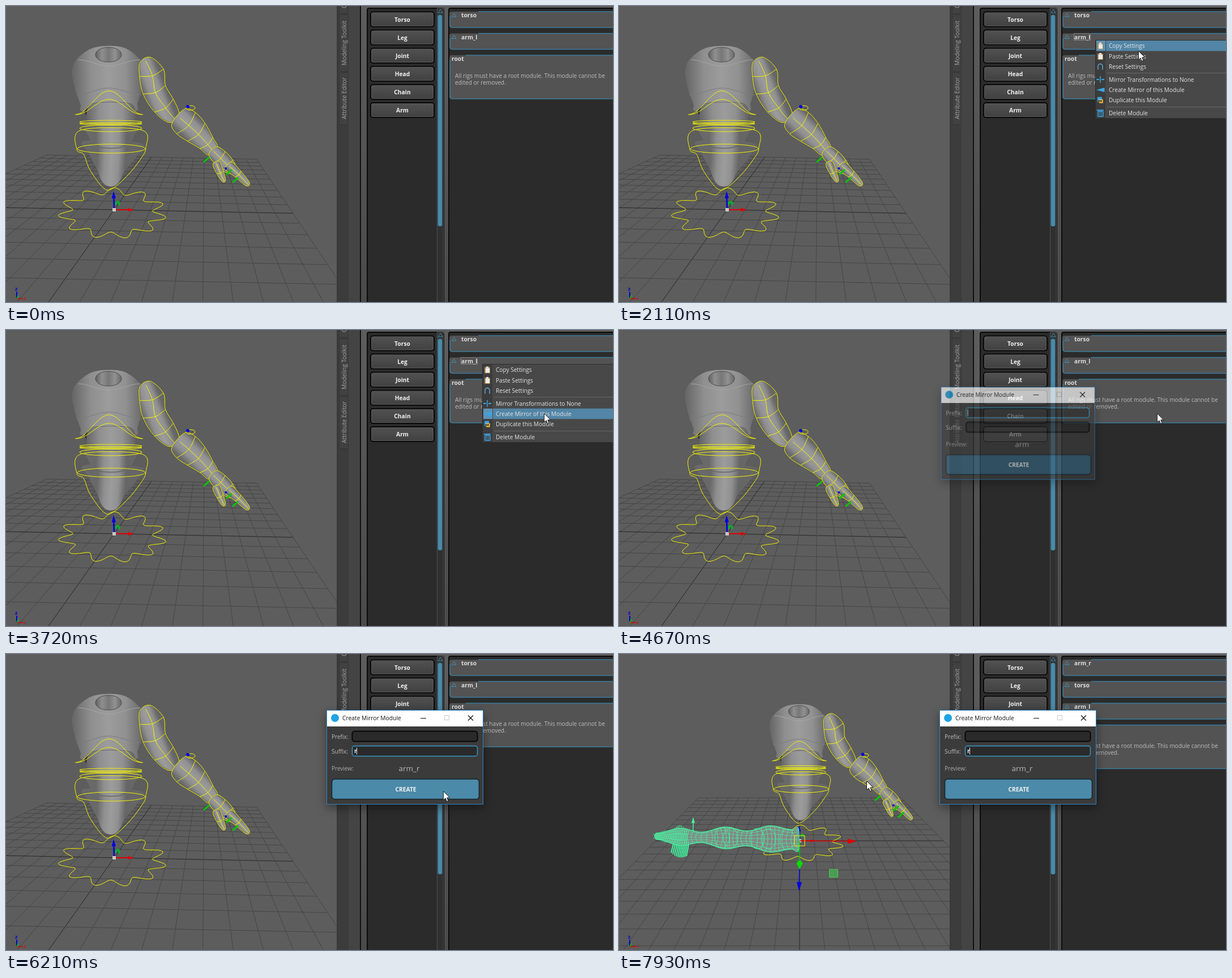
These frames come from a looping animation (1072x523 px, 8 s). An HTML page with a canvas:

```html
<!DOCTYPE html>
<html lang="en">
<head>
<meta charset="utf-8">
<title>Rig module mirroring</title>
<style>
html, body { margin: 0; width: 100%; height: 100%; overflow: hidden; background: #5d5d5d; }
canvas { display: block; }
</style>
</head>
<body>
<canvas id="stage" width="1072" height="523"></canvas>
<script>
const LOOP = 8000, W = 1072, H = 523;
const YELLOW = '#f4f400', BLUE = '#4b8aa8', GREEN = '#43f5a0', RED = '#e00000', DEEP_BLUE = '#0000e0';
const SKIN = ['#696969', '#8f8f8f', '#9c9c9c', '#919191', '#666'];
const MENU_OPEN = 1520, MENU_CLOSE = 4460, FOCUS_SUFFIX = 5490, TYPED = 5730, CREATED = 7690, REFRAMED = 7930;
const screen = document.getElementById('stage').getContext('2d');
const layer = Object.assign(document.createElement('canvas'), { width: W, height: H }).getContext('2d');
let g = screen;

// ---------- helpers ----------
const lerp = (a, b, f) => a + (b - a) * f;
const range = n => Array.from({ length: n }, (_, i) => i);

function paint(fill, stroke, width = 1) {
  if (fill) { g.fillStyle = fill; g.fill(); }
  if (stroke) { g.strokeStyle = stroke; g.lineWidth = width; g.stroke(); }
}
function box(x, y, w, h, r, fill, stroke, width) {
  g.beginPath();
  g.roundRect(x, y, w, h, r);
  paint(fill, stroke, width);
}
function poly(points, fill, stroke, width, closed = true) {
  g.beginPath();
  points.forEach(p => g.lineTo(...p));
  if (closed) g.closePath();
  paint(fill, stroke, width);
}
const line = (x1, y1, x2, y2, color, width) => poly([[x1, y1], [x2, y2]], null, color, width, false);
function oval(x, y, rx, ry, fill, stroke, width) {
  g.beginPath();
  g.ellipse(x, y, rx, ry, 0, 0, 7);
  paint(fill, stroke, width);
}
const dot = (x, y, r, color) => oval(x, y, r, r, color);
function label(str, x, y, { size = 10.3, color = '#ddd', bold = false, align = 'left' } = {}) {
  g.font = `${bold ? 'bold ' : ''}${size}px "Open Sans", "Noto Sans", sans-serif`;
  g.fillStyle = color;
  g.textAlign = align;
  g.fillText(str, x, y);
}
function gradient(a, b, colors) {
  const grad = g.createLinearGradient(...a, ...b);
  colors.forEach((c, i) => grad.addColorStop(i / (colors.length - 1), c));
  return grad;
}
// Catmull-Rom curve through the points
function smooth(p, closed) {
  const n = p.length, at = i => closed ? p[(i + n) % n] : p[Math.max(0, Math.min(n - 1, i))];
  g.beginPath();
  g.moveTo(...p[0]);
  for (let i = 0; i < (closed ? n : n - 1); i++) {
    const [a, b, c, d] = [at(i - 1), at(i), at(i + 1), at(i + 2)];
    g.bezierCurveTo(b[0] + (c[0] - a[0]) / 6, b[1] + (c[1] - a[1]) / 6,
      c[0] - (d[0] - b[0]) / 6, c[1] - (d[1] - b[1]) / 6, ...c);
  }
  if (closed) g.closePath();
}
function fade(alpha, scale, draw) {
  layer.clearRect(0, 0, W, H);
  g = layer;
  draw();
  g = screen;
  g.save();
  g.globalAlpha = alpha;
  g.translate(704, 182);
  g.scale(scale, scale);
  g.drawImage(layer.canvas, -704, -182);
  g.restore();
}

// ---------- 3D view ----------
const nearCamera = {
  body: (x, y) => [x, y], origin: [191, 360], star: [188, 366, 96, 45],
  grid: { a: 316, b: -247, d: 6.3, e: -95, h: -.704, front: .75 },
  unit: 1.24, depth: [-51, 72]
};
const farCamera = {
  body: (x, y) => [lerp(319, 399.5, (x - 182.5) / 100), lerp(90, 172.5, (y - 72) / 100)],
  origin: [319, 330], star: [318, 334, 79, 32],
  grid: { a: 254, b: -133.7, d: 0, e: -30.4, h: -.419, front: 1.1 },
  unit: 1, depth: [-1, 89]
};

function drawGrid({ grid: q, origin: [ox, oy] }) {
  const at = (u, v) => [(ox + q.a * u + q.b * v) / (1 + q.h * v), (oy + q.d * u + q.e * v) / (1 + q.h * v)];
  for (let k = -10; k <= 10; k++) {
    const color = k ? '#464646' : '#262626';
    line(...at(k / 10, -1), ...at(k / 10, q.front), color);
    if (k / 10 < q.front) line(...at(-1, k / 10), ...at(1, k / 10), color);
  }
}

function drawStar([cx, cy, rx, ry]) {
  const points = range(132).map(i => {
    const a = i / 132 * 2 * Math.PI, r = .87 + .13 * Math.cos(11 * (a - 3.037));
    return [cx + rx * r * Math.cos(a), cy + ry * r * Math.sin(a)];
  });
  poly(points, null, YELLOW);
}

// Body parts are spines of [x, y, radius]
const PARTS = {
  pelvis: [[189, 240, 50], [188, 264, 42], [185, 290, 25], [185, 308, 17], [185, 318, 7]],
  waist: [[186, 207, 42], [186, 230, 41], [186, 246, 27], [186, 251, 12]],
  abdomen: [[185, 171, 26], [185, 180, 41], [186, 206, 41], [186, 212, 18]],
  chest: [[182, 72, 22], [182, 88, 50], [181, 110, 64], [181, 140, 61], [182, 172, 51], [182, 187, 43]],
  upperArm: [[246, 95, 9], [257, 118, 21], [262, 148, 20], [279, 176, 19], [297, 199, 10]],
  forearm: [[304, 195, 16], [318, 207, 24], [336, 223, 21], [354, 242, 14], [366, 257, 9]],
  palm: [[365, 255, 9], [377, 267, 14], [391, 281, 13], [401, 291, 7]],
  thumb: [[371, 277, 6], [378, 294, 6], [385, 309, 3]],
  fingers: [[393, 282, 8], [410, 297, 7], [427, 315, 4]]
};
const HIP_CURVE = [[186, 219, 53], [186, 252, 61], [187, 267, 50], [182, 294, 34], [180, 322, 8]];

// Left and right edge of a spine, and the bulging band across each node
function sections(spine, grow = 0) {
  return spine.map(([x, y, r], i) => {
    const [x0, y0] = spine[Math.max(0, i - 1)], [x1, y1] = spine[Math.min(spine.length - 1, i + 1)];
    const len = Math.hypot(x1 - x0, y1 - y0), dx = (x1 - x0) / len, dy = (y1 - y0) / len, w = r + grow;
    return [[x - dy * w, y + dx * w], [x + dx * w * .25, y + dy * w * .25], [x + dy * w, y - dx * w]];
  });
}
const outline = rows => [...rows.map(r => r[0]), ...rows.map(r => r[2]).reverse()];

function drawBody(map) {
  const curve = (points, closed, color = YELLOW, width = 1) => {
    smooth(points.map(p => map(...p)), closed);
    paint(null, color, width);
  };
  const solid = spine => {
    const rows = sections(spine), [a, , b] = rows[rows.length >> 1];
    smooth(outline(rows).map(p => map(...p)), true);
    paint(gradient(map(...a), map(...b), SKIN), '#5c5c5c', .8);
  };
  const limb = (spine, grow) => {
    solid(spine);
    const rows = sections(spine, grow);
    curve(outline(rows), true);
    rows.slice(1, -1).forEach(row => curve(row));
    curve(rows.map(r => r[1]));
  };
  const ellipse = (x, y, rx, ry, fill, stroke, width) => {
    const [cx, cy] = map(x, y), [ex, ey] = map(x + rx, y + ry);
    oval(cx, cy, ex - cx, ey - cy, fill, stroke, width);
  };
  const hem = (cx, y, half, rise, color, width) =>
    curve(range(13).map(i => [cx + half * (i / 6 - 1), y - rise * Math.cos((i / 6 - 1) * Math.PI / 2) ** 2]), false, color, width);

  solid(PARTS.pelvis);
  solid(PARTS.waist);
  ellipse(186, 232, 38, 19, null, '#6d6d6d');
  solid(PARTS.chest);
  ellipse(183, 187, 44, 17, '#2a2a2a');
  solid(PARTS.abdomen);
  hem(182, 157, 58, 12, '#7c7c7c');
  hem(182, 95, 55, -11, '#a6a6a6');
  ellipse(181, 86, 23, 13, gradient(map(158, 86), map(204, 86), ['#606060', '#8f8f8f', '#777', '#919191', '#666']), '#4c4c4c');

  limb(PARTS.upperArm, 1);
  limb(PARTS.forearm, 1);
  for (const part of ['palm', 'thumb', 'fingers']) limb(PARTS[part], 0);

  hem(182, 192, 60, 42);
  hem(182, 192, 58, 27);
  for (const [y, ry] of [[205, 3], [208, 2], [216, 6]]) ellipse(185, y, 55, ry, null, YELLOW);
  const hips = sections(HIP_CURVE);
  curve(outline(hips), true);
  ellipse(186, 252, 60, 8, null, YELLOW);

  for (const [x, y] of [[355, 271], [395, 293], [406, 307]]) {
    const [a, b] = map(x, y);
    line(a - 6, b + 5, a + 4, b - 4, '#00c800', 3);
  }
  ellipse(326, 180, 8, 4, null, YELLOW);
  dot(...map(321, 178), 3, DEEP_BLUE);
  dot(...map(388, 287), 2, DEEP_BLUE);
}

function arrow(x1, y1, x2, y2, color, head, width = 1.5) {
  const len = Math.hypot(x2 - x1, y2 - y1), dx = (x2 - x1) / len, dy = (y2 - y1) / len;
  const bx = x2 - dx * head * 1.8, by = y2 - dy * head * 1.8;
  line(x1, y1, bx, by, color, width);
  poly([[x2, y2], [bx - dy * head / 2, by + dx * head / 2], [bx + dy * head / 2, by - dx * head / 2]], color);
}

function drawRootAxes([x, y], k) {
  arrow(x, y, x - 1, y - 33 * k, DEEP_BLUE, 7 * k, 2.5 * k);
  arrow(x, y, x + 35 * k, y, RED, 6 * k, 2 * k);
  g.beginPath();
  g.arc(x + 6 * k, y - 11 * k, 3 * k, 2.5, 7.5);
  paint(null, '#00b828', 3 * k);
  box(x - 3, y - 3, 6, 6, 0, '#c8c8c8');
}

// The new arm lies along -x: a taper with two muscle bulges, ending in a spiky hand
function drawNewArm({ origin: [ox, oy], unit }) {
  const LENGTH = 254, HAND = 196;
  const at = (s, f) => {
    const half = lerp(22, 9, s / LENGTH) + 4 * Math.cos((s - 52) * Math.PI / 40);
    return [ox - s * unit, oy + (lerp(-2, -8, s / LENGTH) + half * f) * unit];
  };
  const along = f => range(26).map(i => at(lerp(2, LENGTH, i / 25), f));
  smooth([...along(-1), ...along(1).reverse()], true);
  paint('#858585', GREEN, 1.2);
  for (let i = 1; i < 8; i++) {
    smooth(along(Math.cos(i * Math.PI / 8)));
    paint(null, GREEN, .7);
  }
  for (let s = 4; s < HAND; s += 8) {
    const bend = 4 * Math.sin(s / 13);
    smooth([at(s, -1), at(s + bend, 0), at(s, 1)]);
    paint(null, GREEN, .8);
  }
  for (let s = HAND; s < LENGTH; s += 3) {
    const spike = 1.15 + .25 * Math.sin(s * 2.3);
    line(...at(s, -spike), ...at(s + 5, .8), GREEN);
    line(...at(s, spike), ...at(s + 5, -.8), GREEN);
    if (s < HAND + 30) line(...at(s, 1), ...at(s + 4, 2.4), GREEN, 2);
  }
  for (const s of [22, 55, 75, 122, 137]) {
    const [x, y] = at(s, 0);
    oval(x, y, 13 * unit, 18 * unit, null, GREEN, .9);
  }
  arrow(...at(188, -1), ...at(188, -3.2), GREEN, 6);
}

function drawManipulator({ origin: [x, y], depth: [dx, dy] }) {
  arrow(x, y, x + 101, y + 1, RED, 9);
  line(x, y, x, y + 41, '#00d800', 1.5);
  arrow(x, y + 45, x + dx, y + dy, DEEP_BLUE, 9);
  dot(x, y + 40, 5, '#00e000');
  poly([[x - 5, y + 40], [x + 5, y + 40], [x, y + 51]], '#00e000');
  box(x - 9, y - 9, 18, 18, 0, null, YELLOW);
  box(x + 52.5, y + 50.5, 15, 14, 0, 'rgba(67,200,80,.6)', '#43c850');
}

function drawViewport(t) {
  const camera = t < REFRAMED ? nearCamera : farCamera;
  g.save();
  g.beginPath();
  g.rect(0, 0, 584, H);
  g.clip();
  g.fillStyle = '#5d5d5d';
  g.fillRect(0, 0, 584, H);
  drawGrid(camera);
  drawBody(camera.body);
  drawStar(camera.star);
  drawRootAxes(camera.origin, t < REFRAMED ? 1 : .8);
  if (t >= CREATED) {
    drawNewArm(camera);
    drawManipulator(camera);
  }
  line(19, 517, 19, 505, DEEP_BLUE, 2);
  line(19, 517, 30, 517, RED, 1.5);
  line(19, 517, 22, 511, '#00c000', 2);
  label('z', 16, 503, { size: 9, color: DEEP_BLUE, bold: true });
  label('x', 31, 519, { size: 8, color: RED });
  g.restore();
}

// ---------- side panels ----------
function sideTab(str, top, height, textBottom) {
  box(588.5, top + .5, 16, height, 1, '#414141', '#353535');
  g.save();
  g.translate(600.5, textBottom);
  g.rotate(-Math.PI / 2);
  label(str, 0, 0, { color: '#a4a4a4' });
  g.restore();
}
const triangle = (x, y) => poly([[x - 4, y + 3], [x, y - 3], [x + 4, y + 3]], null, '#3f91b5');

function drawModule(name, y, isRoot) {
  const h = isRoot ? 77 : 28, gap = isRoot ? 812 : 834;
  box(783, y, 300, h, 4, '#535353');
  g.beginPath();
  g.moveTo(gap, y);
  g.lineTo(W, y);
  g.moveTo(784, y + 8);
  g.lineTo(784, y + h - 5);
  g.quadraticCurveTo(784, y + h, 789, y + h);
  g.lineTo(W, y + h);
  paint(null, '#3c7c9b', 1.6);
  label(name, isRoot ? 787 : 804, y + 10, { bold: true });
  if (!isRoot) return triangle(791, y + 6);
  ['All rigs must have a root module. This module cannot be', 'edited or removed.']
    .forEach((str, i) => label(str, 793, y + 40 + 12 * i, { size: 10.1, color: '#bcbcbc' }));
}

function drawPanels(t) {
  box(584, 0, W, H, 0, '#444');
  box(584, 0, 3, H, 0, '#3a3a3a');
  box(587, 0, 18, H, 0, '#3c3c3c');
  sideTab('Channel Box / Layer Editor', -80, 93, 4);
  sideTab('Modeling Toolkit', 15, 100, 105);
  sideTab('Attribute Editor', 117, 92, 200);
  box(625, 0, W, H, 0, gradient([0, 0], [0, H], ['#5d5d5d', '#4a4a4a']));
  box(625, 0, 2, H, 0, '#111');
  for (const [x, w] of [[638, 135], [782, 400]]) box(x, 4, w, H + 9, 3, '#2b2b2b', '#0c0c0c', 2);

  ['Torso', 'Leg', 'Joint', 'Head', 'Chain', 'Arm'].forEach((name, i) => {
    const y = 10.5 + 32.1 * i;
    box(644, y, 112, 26, 4, gradient([0, y], [0, y + 26], ['#525252', '#404040']), '#080808', 2);
    box(645.5, y + 1.5, 109, 23, 3, null, '#5a5a5a');
    label(name, 700, y + 17, { bold: true, align: 'center', color: '#f0f0f0' });
  });
  box(761.5, 4, 11, H + 9, 0, '#303030', '#525252');
  triangle(767, 9);
  box(762.5, 15.5, 8, 374, 3, BLUE, '#274c5e');

  const modules = [...(t < CREATED ? [] : ['arm_r']), 'torso', 'arm_l', 'root'];
  modules.forEach((name, i) => drawModule(name, 10 + 38.5 * i, name === 'root'));
  if (t >= MENU_OPEN && t < MENU_CLOSE) {
    g.setLineDash([1, 1]);
    box(803.5, 48.5, 29, 12, 0, null, '#bbb');
    g.setLineDash([]);
  }
}

// ---------- context menu ----------
const SKY = '#3ba4e4';
const icons = {
  clipboard(y) {
    box(845, y - 5, 10, 11, 1, '#a98a55');
    box(847, y - 3, 7, 8, 0, '#ececec');
    box(848, y - 6, 4, 3, 0, '#ddd');
  },
  arch(y) {
    g.beginPath();
    g.moveTo(846, y + 5);
    g.arc(850, y - 1, 4, Math.PI, 0);
    g.lineTo(854, y + 5);
    paint(null, '#5d9fc4', 1.6);
  },
  mirror(y) {
    line(850, y - 6, 850, y + 6, SKY, 1.5);
    line(843, y, 848, y, SKY, 2);
    line(852, y, 857, y, SKY, 2);
  },
  arrow(y) { arrow(857, y, 843, y, SKY, 8, 5); },
  copies(y) {
    box(845, y - 6, 8, 9, 1, SKY);
    box(848, y - 2, 7, 7, 1, '#d8a83c');
    line(846, y + 1, 853, y + 1, '#222', 1.5);
  },
  bin(y) {
    line(844, y - 5, 856, y - 5, SKY, 2);
    box(846, y - 3, 9, 9, 1, null, SKY, 1.5);
    for (const x of [849, 852]) line(x, y - 2, x, y + 5, SKY);
  }
};
// label, icon, separator group
const menuRows = [
  ['Copy Settings', 'clipboard', 0], ['Paste Settings', 'clipboard', 0], ['Reset Settings', 'arch', 0],
  ['Mirror Transformations to None', 'mirror', 1], ['Create Mirror of this Module', 'arrow', 1],
  ['Duplicate this Module', 'copies', 1], ['Delete Module', 'bin', 2]
].map(([name, icon, group], i) => ({ name, icon, y: 61 + 18.45 * i + 4 * group }));

function drawMenu(hoverY) {
  box(841.5, 60.5, 240, 138, 0, '#484848', '#2d2d2d');
  box(842, 61, 17, 137, 0, '#3c3c3c');
  const hover = menuRows.findLast(row => row.y <= hoverY);
  for (const row of menuRows) {
    if (row === hover) {
      box(860, row.y, 220, 18.5, 0, '#5285a6');
      box(843, row.y, 16, 18.5, 0, '#5d93b5');
    }
    icons[row.icon](row.y + 9.5);
    label(row.name, 865, row.y + 13.2, { size: 10.1, color: '#e4e4e4' });
  }
  for (const y of [118.5, 178.5]) line(862, y, W, y, '#666');
}

// ---------- dialog ----------
function drawField(name, y, focused, value, caret) {
  label(name, 575, y + 13, { size: 10, color: '#bcbcbc' });
  box(611.5, y, 221, 18, 4, '#2a2a2a', focused ? '#3597c8' : '#080808', focused ? 1.5 : 2);
  label(value, 615, y + 12.5, { bold: true, color: '#eee' });
  const x = value ? 619.5 : 614.5;
  if (focused && caret) line(x, y + 3, x, y + 15, '#eee');
}
function drawDialog(t) {
  const inSuffix = t >= FOCUS_SUFFIX, typed = t >= TYPED;
  const caret = t < 5120 || (t >= 5240 && t < 6580) || t >= CREATED;
  g.save();
  g.shadowColor = 'rgba(0,0,0,.4)';
  g.shadowBlur = 16;
  g.shadowOffsetY = 6;
  box(566, 99, 277, 167, 0, '#3b3b3b');
  g.restore();
  box(567, 100, 275, 28, 0, '#fff');
  box(566.5, 99.5, 276, 166, 0, null, '#2d86c8');
  dot(581, 113, 7, '#1ea4e4');
  label('Create Mirror Module', 594, 117, { color: '#161616' });
  line(732, 113.5, 742, 113.5, '#111');
  box(774.5, 108.5, 8, 8, 0, null, '#c8c8c8');
  line(816, 108.5, 825, 117.5, '#111', 1.2);
  line(825, 108.5, 816, 117.5, '#111', 1.2);

  drawField('Prefix:', 136.5, !inSuffix, '', caret);
  drawField('Suffix:', 162.5, inSuffix, typed ? 'r' : '', caret);
  label('Preview:', 575, 205.5, { size: 10, color: '#aaa' });
  label(typed ? 'arm_r' : 'arm', 712, 207, { size: 13.4, color: '#bbb', align: 'center' });
  box(575.5, 221, 260, 35.5, 5, typed ? BLUE : '#33627c', '#16242c', 1.5);
  label('CREATE', 706, 243, { bold: true, align: 'center', color: '#f2f2f2' });
}

// ---------- pointer ----------
const STEP = 120;
// start time, steps of the move, destination
const moves = [
  [0, 1, 1072, 181], [490, 7, 843, 59], [1310, 1, 841, 59], [1880, 3, 917, 79], [2240, 4, 946, 133],
  [3600, 2, 950, 147], [5120, 2, 941, 147], [5490, 7, 772, 242], [6330, 4, 427, 215], [7320, 1, 437, 224]
];
function pointerAt(t) {
  const i = moves.findLastIndex(m => m[0] <= t), [start, steps, x, y] = moves[i];
  const [, , fromX, fromY] = moves[Math.max(0, i - 1)];
  const f = Math.min(steps, Math.floor((t - start + 12) / STEP) + 1) / steps;
  return [Math.round(lerp(fromX, x, f)), Math.round(lerp(fromY, y, f))];
}
function drawPointer([x, y]) {
  const shape = [[0, 0], [0, 15.5], [3.6, 12.3], [6, 18], [8.5, 17], [6.2, 11.4], [11, 11.2]];
  poly(shape.map(([a, b]) => [x + a + .5, y + b + .5]), '#fff', '#111', .9);
}

function draw(t) {
  const pointer = pointerAt(t);
  drawPanels(t);
  drawViewport(t);
  if (t >= MENU_OPEN && t < MENU_CLOSE) fade(t < MENU_OPEN + 110 ? .6 : 1, 1, () => drawMenu(t < 1880 ? 0 : pointer[1]));
  const shown = Math.min(1, Math.floor((t - MENU_CLOSE + 5) / 107) / 3);
  if (shown > 0) fade(shown, lerp(.95, 1, shown), () => drawDialog(t));
  drawPointer(pointer);
}

const began = performance.now();
function tick() {
  draw((performance.now() - began) % LOOP);
  requestAnimationFrame(tick);
}
tick();
</script>
</body>
</html>
```
